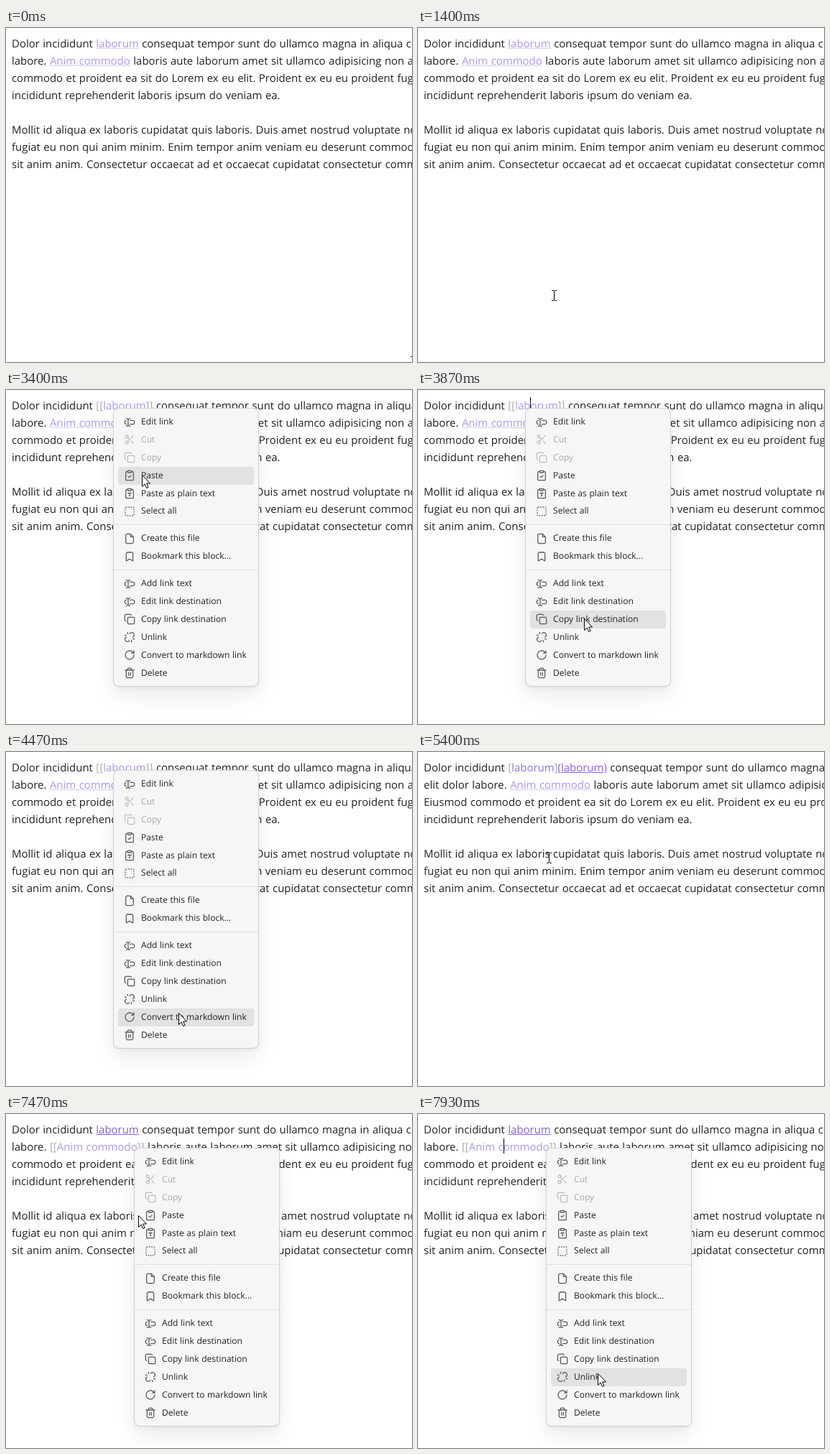
An HTML page for the animation above (8 s loop, 565 by 465 pixels).

```html
<!DOCTYPE html>
<html lang="en">
<head>
<meta charset="utf-8">
<title>Link context menu</title>
<style>
  html, body { margin: 0; width: 100%; height: 100%; overflow: hidden; background: #fff; }
  body { position: relative; color: #222; text-rendering: geometricPrecision; }
  #text {
    position: absolute; left: 8px; top: 10px; white-space: pre;
    font: 14.95px/24px "Open Sans", "Noto Sans", sans-serif; word-spacing: .6px;
  }
  #text * { font: inherit; text-decoration: none; }
  #text i { color: #ababab; }
  #text b { color: #ad97f8; }
  #text em { color: #9373f2; }
  #text .link { text-decoration: underline 1px #d8c8fb; }
  #text u { color: #8a5cf5; text-decoration: underline 1px; }
  #text .hover { color: #9f7cec; text-decoration-color: #9f7cec; }
  #text s { position: absolute; width: 1px; height: 21px; background: #000; }
  #menu {
    position: absolute; box-sizing: border-box; width: 203px; height: 388px; padding: 6px;
    background: #f6f6f6; border: 1px solid #d0d0d0; border-radius: 8px;
    box-shadow: 0 1px 2px #00000007, 0 3px 7px #0000000b, 0 15px 30px #00000012;
    font: 12.1px/24.9px "Open Sans", "Noto Sans", sans-serif; word-spacing: .4px;
  }
  .item { position: relative; height: 24.9px; padding-left: 32px; border-radius: 4px; white-space: pre; }
  .item.hover { background: #e2e2e2; }
  .item.off { opacity: .36; }
  .item svg {
    position: absolute; left: 8px; top: 4.5px; width: 16px; height: 16px;
    fill: none; stroke: #5a5a5a; stroke-width: 1.9; stroke-linecap: round; stroke-linejoin: round;
  }
  .rule { margin: 6px -6px; height: 1px; background: #e0e0e0; }
  #pointer { position: absolute; left: 0; top: 0; width: 565px; height: 465px; pointer-events: none; }
</style>
</head>
<body>
<div id="text"></div>
<div id="menu"></div>
<svg id="pointer"><path stroke="#000"/></svg>
<script>
const $ = id => document.getElementById(id);
const FPS = 15, STEPS = 120, BLINK = FPS / 2;

// ---- Menu ----
const line = d => `<path d="${d}"/>`;
const ring = (x, y, r) => `<circle cx="${x}" cy="${y}" r="${r}"/>`;
const box = (x, y, w, h, r = 2, dash = 'none') =>
  `<rect x="${x}" y="${y}" width="${w}" height="${h}" rx="${r}" stroke-dasharray="${dash}"/>`;
const board = box(8, 2, 8, 4, 1) + line('M8 4H5L4 5V21L5 22H19L20 21V5L19 4H16');
const icons = {
  input: line('M9 6v12M5 4Q9 4 9 7 9 4 13 4M5 20Q9 20 9 17 9 20 13 20M5 8H4L2 10v4l2 2H5M13 8h7l2 2v4l-2 2h-7'),
  cut: ring(6, 6, 3) + ring(6, 18, 3) + line('M8 8l4 4M20 4 8 16M15 15l5 5'),
  copy: box(8, 8, 14, 14) + line('M4 16L2 14V4L4 2H14L16 4'),
  paste: board + line('M9 14l2 2 4-4'),
  plain: board + line('M9 12v-1h6v1M11 17h2M12 11v6'),
  select: box(3, 3, 18, 18, 2, '1 3.9'),
  file: line('M14 2H6L4 4V20l2 2H18l2-2V8L14 2v6h6'),
  mark: line('M19 21l-7-4-7 4V5l2-2H17l2 2z'),
  unlink: line('M12 5l1.5-1.5a5 5 0 0 1 7 7L19 12M12 19l-1.5 1.5a5 5 0 0 1-7-7L5 12M8 2v3M2 8h3M16 19v3M19 16h3'),
  turn: line('M21 12a9 9 0 1 1-3-6.7L21 8V3M21 8h-5'),
  trash: line('M3 6h18M8 6V3L9 2h6l1 1V6M5 6V20l2 2H17l2-2V6M10 11v6M14 11v6')
};
const item = (icon, label, state = '') =>
  `<div class="item ${state}"><svg viewBox="0 0 24 24">${icons[icon]}</svg>${label}</div>`;
const rule = '<div class="rule"></div>';
$('menu').innerHTML = [
  item('input', 'Edit link'),
  item('cut', 'Cut', 'off'),
  item('copy', 'Copy', 'off'),
  item('paste', 'Paste'),
  item('plain', 'Paste as plain text'),
  item('select', 'Select all'),
  rule,
  item('file', 'Create this file'),
  item('mark', 'Bookmark this block...'),
  rule,
  item('input', 'Add link text'),
  item('input', 'Edit link destination'),
  item('copy', 'Copy link destination'),
  item('unlink', 'Unlink'),
  item('turn', 'Convert to markdown link'),
  item('trash', 'Delete')
].join('');

const menus = [
  { from: 44, to: 73, x: 149, y: 25 },
  { from: 101, to: STEPS, x: 178, y: 47 }
];

// ---- Text ----
const page = ({ first, second, wrap2 = '', wrap3 = '' }) =>
`Dolor incididunt ${first} consequat tempor sunt do ullamco magna in aliqua consectetur
${wrap2}labore. ${second} laboris aute laborum amet sit ullamco adipisicing non anim
${wrap3}commodo et proident ea sit do Lorem ex eu elit. Proident ex eu eu proident fugiat
incididunt reprehenderit laboris ipsum do veniam ea.

Mollit id aliqua ex laboris cupidatat quis laboris. Duis amet nostrud voluptate non
fugiat eu non qui anim minim. Enim tempor anim veniam eu deserunt commodo
sit anim anim. Consectetur occaecat ad et occaecat cupidatat consectetur commodo`;

const link = name => `<b class="link">${name}</b>`;
const raw = name => `<i>[[</i><b>${name}</b><i>]]</i>`;
const caret = '<s></s>';
const edits = [
  { from: 0, first: link('laborum'), second: link('Anim commodo') },
  { from: 42, first: raw(`lab${caret}orum`), second: link('Anim commodo') },
  { from: 73, first: `<i>[</i><em>laborum</em><i>]</i><u>(laborum)</u>${caret}`,
    second: link('Anim commodo'), wrap2: 'elit dolor ', wrap3: 'Eiusmod ' },
  { from: 99, first: '<u>laborum</u>', second: raw(`Anim c${caret}ommodo`) }
];

// ---- Pointer ----
const shapes = {
  arrow: 'M.5.5V16.5L4.2 13 6.6 18.5 9 17.5 6.7 12H11.5Z',
  hand: 'M-1.8 2Q0-1.5 1.6 2V10 7.5Q3.5 5 4.8 8V10.5 8Q6.5 6 7.8 9V11 9Q10 7.5 10.4 10.3V15' +
    'Q10.4 18 8.3 22.5H-1.2Q-1.5 20-5 15L-6.6 12.2Q-6.5 9-4 11L-1.8 13.5Z',
  beam: 'M-3.5-7h3M.5-7h3M0-6.5v13M-3.5 7h3M.5 7h3'
};
// Each move: leave step, arrive step, destination.
const moves = [
  [0, 6, 743, 494], [6, 21, 189, 372], [23, 29, 133, 27], [30, 33, 104, 25], [33, 37, 148, 25],
  [47, 51, 189, 118], [51, 58, 231, 318], [58, 67, 240, 363],
  [75, 81, 182, 147], [81, 91, 178, 46], [106, 112, 184, 141], [112, 119, 250, 361]
];
const smooth = k => k * k * (3 - 2 * k);

function pointerAt(step) {
  let x = 566, y = 464;
  for (const [leave, arrive, toX, toY] of moves) {
    if (step <= leave) break;
    const k = smooth(Math.min(1, (step - leave) / (arrive - leave)));
    x += (toX - x) * k;
    y += (toY - y) * k;
  }
  return [Math.round(x), Math.round(y)];
}

function render(step) {
  const edit = edits.findLast(e => step >= e.from);
  $('text').innerHTML = page(edit);
  const caretOn = Math.floor((step - edit.from) / BLINK) % 2 === 0;
  document.querySelectorAll('s').forEach(s => s.hidden = !caretOn);

  const menu = menus.find(m => step >= m.from && step < m.to);
  $('menu').hidden = !menu;
  if (menu) {
    $('menu').style.left = menu.x + 'px';
    $('menu').style.top = menu.y + 'px';
  }

  const [x, y] = pointerAt(step);
  const under = document.elementFromPoint(x, y);
  const target = under?.closest('b, .item');
  document.querySelector('.item.hover')?.classList.remove('hover');
  target?.classList.add('hover');

  const kind = under?.closest('#menu') ? 'arrow' : target ? 'hand' : 'beam';
  const half = kind === 'beam' ? .5 : 0;
  const cursor = $('pointer').firstElementChild;
  cursor.setAttribute('d', shapes[kind]);
  cursor.setAttribute('fill', kind === 'beam' ? 'none' : '#fff');
  cursor.setAttribute('transform', `translate(${x + half} ${y + half})`);
}

const start = performance.now();
let shown = -1;
function tick() {
  // A small lead keeps steps on time despite rounding to 10 ms.
  const step = Math.floor((performance.now() - start + 4) * FPS / 1000) % STEPS;
  if (step !== shown) render(shown = step);
  requestAnimationFrame(tick);
}
tick();
</script>
</body>
</html>
```
